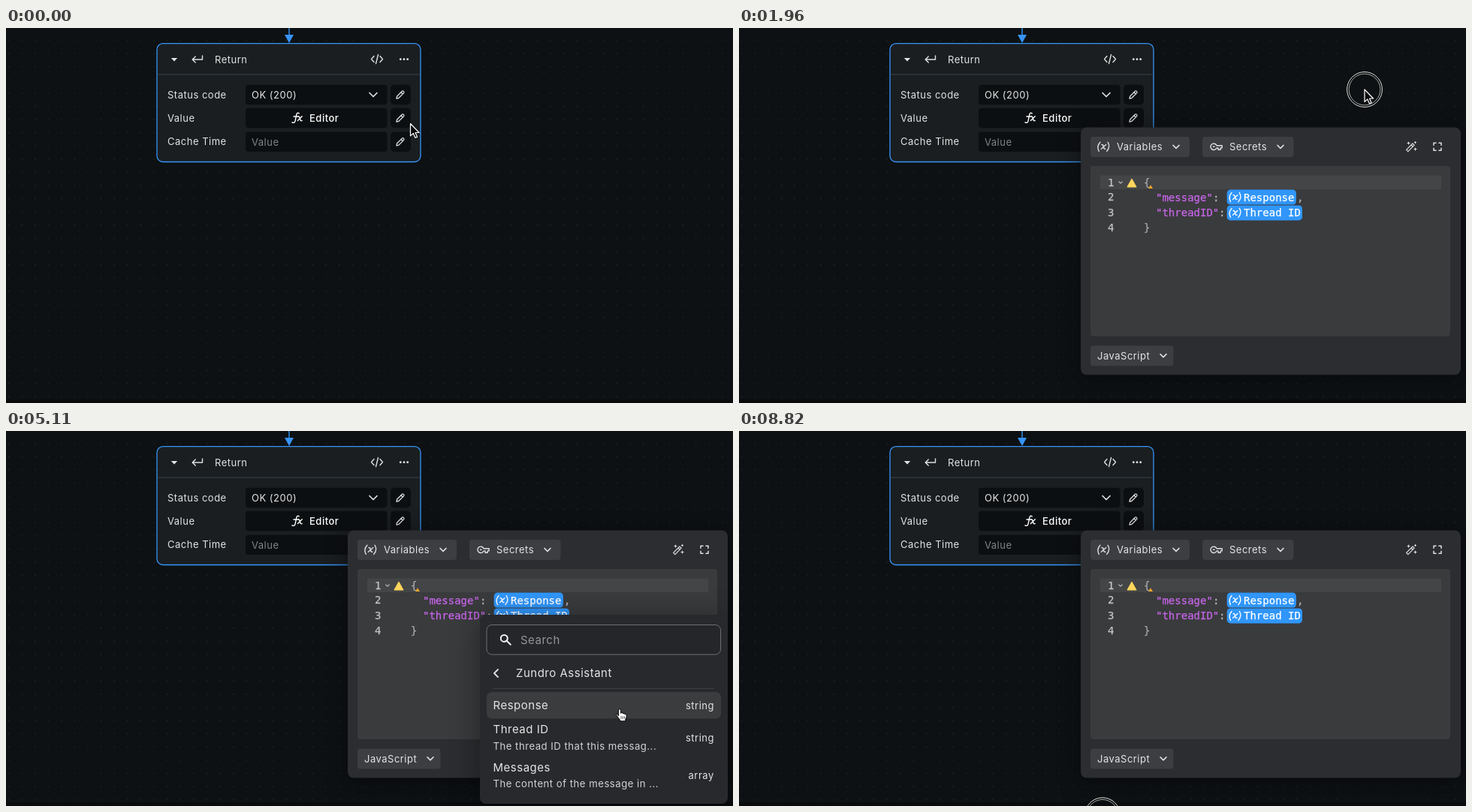
Write an HTML page that moves like this. It is 968x500 px and loops after 8.89 s.

```html
<!DOCTYPE html>
<html lang="en">
<head>
<meta charset="utf-8">
<title>Return block editor</title>
<style>
  html, body { margin: 0; width: 100%; height: 100%; overflow: hidden; background: #0d1113; }
  svg { display: block; width: 968px; height: 500px; }
  text { font-family: Inter, Roboto, sans-serif; letter-spacing: .5px; white-space: pre; }
  text.mono { font-family: "DejaVu Sans Mono", monospace; letter-spacing: 0; stroke-width: .25px; }
  .panelBack { filter: drop-shadow(0 5px 14px rgba(5, 3, 9, .6)); }
  .popupBack { filter: drop-shadow(0 6px 19px rgba(0, 0, 0, .4)); }
  .icon { fill: none; stroke-linecap: round; stroke-linejoin: round; }
</style>
</head>
<body>
<svg id="stage" viewBox="0 0 968 500"></svg>
<script>
const LOOP = 8890, STEP = 70;
const BLUE = '#3794fa';

// ---- drawing helpers -------------------------------------------------
const rect = (x, y, w, h, r, fill, extra = '') =>
  `<rect x="${x}" y="${y}" width="${w}" height="${h}" rx="${r}" fill="${fill}" ${extra}/>`;
const text = (x, mid, str, size = 13, fill = '#e3e4e5', extra = '') =>
  `<text x="${x}" y="${mid + size * .36}" font-size="${size}" fill="${fill}" ${extra}>${str}</text>`;
const mono = (x, mid, str, fill) => text(x, mid, str, 14, fill, `class="mono" stroke="${fill}"`);
const icon = (x, y, d, width = 1.4, stroke = '#dfe0e1') =>
  `<path class="icon" transform="translate(${x} ${y})" d="${d}" stroke="${stroke}" stroke-width="${width}"/>`;
const poly = (points, fill) => `<polygon points="${points}" fill="${fill}"/>`;
const group = (id, body, extra = '') => `<g id="${id}" ${extra}>${body}</g>`;

const DOWN = 'M-4-2 0 2 4-2', RIGHT = 'M-2.5-5 2.5 0-2.5 5', LEFT = 'M2.5-5-2.5 0 2.5 5';
const PENCIL = 'M-5 5-4.3 2 2.4-4.7Q3.4-5.6 4.4-4.6T4.7-2.4L-2 4.3ZM1-3.3 3.3-1';
const VARIABLE = 'M-4.6-6Q-9.8-.4-6.2 6M5.6-6Q9.4 0 4.2 6M-2.6-2.7Q-.8-3.6-.2 0T2.4 2.8M3.2-2.9-3.2 2.9';

// ---- canvas and block ------------------------------------------------
function field(y) {
  return rect(319, y, 188.5, 26.5, 4, '#0c0f11') + rect(512, y, 27, 26.5, 5, '#0c0f11') +
    icon(525, y + 13.3, PENCIL, 1.3);
}

const backdrop = `
  <defs><pattern id="dots" x="2.7" y="15.7" width="17.6" height="17.6" patternUnits="userSpaceOnUse">
    <circle cx=".8" cy=".8" r=".75" fill="#282d30"/></pattern></defs>` +
  rect(0, 0, 968, 500, 0, '#0d1113') + rect(0, 0, 968, 500, 0, 'url(#dots)') +
  rect(0, 495.5, 968, 5, 0, '#090b0d');

const block =
  `<path d="M377 0V12" stroke="${BLUE}" stroke-width="1.4"/>` + poly('371,9 383,9 377,20', BLUE) +
  rect(201, 20.7, 351, 157.8, 8, '#1a1e20', `stroke="${BLUE}" stroke-width="1.3"`) +
  '<path d="M201.6 62H551.4" stroke="#364350"/>' +
  poly('219.8,40 228.2,40 224,44.4', '#e3e4e5') +
  icon(255, 42, 'M6.5-5V0H-6.5M-2.8-4-6.8 0-2.8 4', 1.4) +
  text(278, 42, 'Return') +
  icon(494, 41.5, 'M-4-4-7.5 0-4 4M4-4 7.5 0 4 4M1.5-6-1.5 6', 1.4) +
  [525.3, 530, 534.7].map(x => `<circle cx="${x}" cy="41.7" r="1.4" fill="#e3e4e5"/>`).join('') +
  text(215, 89.5, 'Status code') + text(215, 120, 'Value') + text(215, 151.7, 'Cache Time') +
  [75.7, 106.7, 138.5].map(field).join('') +
  text(327, 89, 'OK (200)') + icon(489, 89, 'M-5-2.5 0 2.5 5-2.5', 1.7) +
  icon(387, 120, 'M3.2-6.2Q.8-7.8-.2-4.6L-2 4.2Q-3 7.4-6 5.8M-4-2H1.8M2-2.2Q3.6-2.6 4.4 1T7.2 3.4M7.2-2.2 1.4 3.6', 1.4, '#fff') +
  text(404, 120, 'Editor', 13, '#fff', 'font-weight="500"') +
  text(327, 152.3, 'Value', 13, '#818486');

// ---- code panel ------------------------------------------------------
const button = (x, y, w, label, labelX, arrowX) =>
  rect(x, y, w, 27, 4, '#3c3e41') + text(labelX, y + 13.4, label) + icon(arrowX, y + 13.4, DOWN, 1.5);
const chip = (y, w, label) =>
  rect(649.7, y, w, 20, 4.5, '#3096fa') + icon(660.7, y + 10, VARIABLE, 1.4, '#fff') +
  mono(672, y + 10, label, '#fff');

const panel =
  rect(455, 132.5, 506, 330, 8, '#2b2d30', 'class="panelBack"') +
  button(468, 145, 132, 'Variables', 503, 582) + icon(485.5, 158.3, VARIABLE, 1.4) +
  button(617, 145, 121.5, 'Secrets', 653, 721) +
  icon(635, 158.3, 'M1-1.6A4.2 4.2 0 1 0 1 1.6H3V4H6.2V1.6H8.2V-1.6ZM-3.6 0H-2', 1.4) +
  icon(895, 158, 'M-6.4 4.4 2-4 4.2-1.8-4.2 6.6ZM0-2 2.2 .2M-3.5-6V-3M-5-4.5H-2M5.5 2V5M4 3.5H7M5.5-6.5V-4.5M4.5-5.5H6.5', 1.2) +
  icon(930, 158.3, 'M-5-2V-5H-2M2-5H5V-2M5 2V5H2M-2 5H-5V2', 1.5) +
  rect(468, 184, 479, 227, 4, '#3a3b3d') + rect(481, 196.5, 454, 18.5, 0, '#444547') +
  [206, 225, 246, 266].map((y, i) => mono(491, y, i + 1, '#c4c5c6')).join('') +
  icon(508, 206, 'M-2.2-1 0 1.2 2.2-1', 1.2, '#b5b6b8') +
  '<path d="M523 201.6 528.7 211.8H517.3Z" fill="#ffd65c" stroke="#ffd65c" stroke-width="1.4" stroke-linejoin="round"/>' +
  mono(539, 206, '{', '#a9aaac') + poly('545,214 551,214 548,209.3', '#eda42c') +
  mono(555, 225.5, '"message"', '#c866ea') + mono(631, 225.5, ':', '#b4b5b7') +
  chip(215.6, 92.2, 'Response') + mono(743, 225.5, ',', '#b4b5b7') +
  mono(555, 246, '"threadID"', '#c866ea') + mono(639, 246, ':', '#b4b5b7') +
  chip(236.4, 100.3, 'Thread ID') +
  mono(539, 266, '}', '#a9aaac') +
  rect(538, 198.5, 1, 15, 0, '#8fb8e8', 'id="codeCaret"') +
  button(468, 423.5, 110.5, 'JavaScript', 477, 565);

// ---- variable picker -------------------------------------------------
const SOURCE = 'Zundro Assistant';
const item = (mid, name, typeX, type, typeMid, note = '') =>
  text(648.5, mid, name, 15) + text(typeX, typeMid, type) +
  (note && text(648.5, typeMid + 11, note, 13.15, '#d2d3d5'));

const picker =
  rect(631, 245, 330, 146, 8, '#28292c', 'id="sheet" class="popupBack"') +
  rect(640, 258.5, 311.5, 39.5, 7, '#252629', 'id="search"') +
  icon(665, 278, 'M6.8 6.8 2.2 2.2M2.8-1.6A4.5 4.5 0 1 1-6.2-1.6 4.5 4.5 0 0 1 2.8-1.6', 2, '#f1f1f2') +
  text(685, 278.7, 'Search', 15, '#939598') + rect(685, 269.5, 1.1, 18.5, 0, '#7fb8f7', 'id="searchCaret"') +
  rect(640, 348, 312, 35.5, 7, '#3b3c3e', 'id="hover"') +
  group('sources',
    text(648.5, 325, 'Request', 15) + text(648.5, 360.5, SOURCE, 15) +
    icon(929, 325, RIGHT, 2, '#f1f1f2') + icon(929, 360.5, RIGHT, 2, '#f1f1f2')) +
  group('items',
    icon(652.5, 323, LEFT, 1.8) + text(679, 323, SOURCE, 15) +
    '<path d="M648 343.5H943" stroke="#3d3e41"/>' +
    item(366, 'Response', 905, 'string', 366) +
    item(398, 'Thread ID', 905, 'string', 409, 'The thread ID that this messag...') +
    item(448.5, 'Messages', 908.5, 'array', 459.5, 'The content of the message in ...'));

// ---- pointer ---------------------------------------------------------
const pointer =
  group('ring', ['22.4" stroke="#0008" stroke-width="3', '23.4" stroke="#e6e6e6" stroke-width="1', '20.9" stroke="#d0d0d0" stroke-width=".8']
    .map(a => `<circle fill="none" r="${a}"/>`).join('')) +
  group('arrow', '<path d="M0 0V16.4L3.8 12.9 6.4 18.8 9 17.6 6.5 12H11.6Z" fill="#090909" stroke="#fff" stroke-width="1.2" stroke-linejoin="round"/>') +
  group('beam', ['#111" stroke-width="2.8', '#fff" stroke-width="1.2']
    .map(a => `<path fill="none" d="M-4-8Q0-8 0-5.5Q0-8 4-8M0-5.5V5.5M-4 8Q0 8 0 5.5Q0 8 4 8M-2 2H2" stroke="${a}"/>`).join('')) +
  group('hand', `<path d="M-1.6 8.5V1.2Q-1.6-.4-.1-.4T1.4 1.2V5Q3.6 3.6 4.4 5.6Q6.2 4.6 6.8 6.4Q9 6 9 8.4
    Q9.2 12 7.6 13.4V15.6H.2V14Q-2 11.6-3.2 9.6-5.4 7-4.4 6.2-3.2 5.4-1.6 8.5Z"
    fill="#fff" stroke="#111" stroke-width="1.1" stroke-linejoin="round"/>
    <path d="M1.8 9.2V12.6M4 9.2V12.6M6.2 9.2V12.6" stroke="#222" stroke-width=".8"/>`);

document.getElementById('stage').innerHTML =
  backdrop + block + group('panel', panel) + group('picker', picker) + pointer;

const el = {};
document.querySelectorAll('[id]').forEach(node => el[node.id] = node);

// ---- timeline --------------------------------------------------------
const ease = {
  both: p => p * p * (3 - 2 * p),
  in: p => p * p,
  out: p => 1 - (1 - p) ** 2
};
// time, x, y, pointer shape, easing towards this stop
const PATH = [
  [0, 538.5, 127.5, 'arrow'], [40, 538.5, 127.5, 'arrow'],
  [210, 471, 109, 'hand'], [350, 471, 109, 'hand'],
  [770, 497, 262, 'beam'], [1190, 497, 262, 'beam'],
  [1400, 724, 201, 'beam', 'in'], [1750, 833, 82, 'arrow', 'out'], [2030, 833, 82, 'arrow'],
  [2170, 690, 225, 'arrow'], [2590, 690, 225, 'arrow'],
  [3080, 932, 364.5, 'hand'], [4230, 932, 364.5, 'hand'],
  [4830, 817, 368.5, 'hand'], [5040, 817, 368.5, 'hand'],
  [5460, 820, 404, 'hand'], [5740, 820, 404, 'hand'],
  [6090, 835, 457, 'hand'], [6930, 835, 457, 'hand'],
  [7210, 832.4, 62, 'arrow'], [7840, 832.4, 62, 'arrow'],
  [8610, 489, 494, 'arrow'], [8680, 486, 508, 'arrow'], [8820, 484, 512.3, 'arrow'], [LOOP, 484, 512.3, 'arrow']
];
const CLICKS = [[210, 350], [1960, 2100], [2170, 2310], [3990, 4130], [7630, 7770], [8820, LOOP]];

const between = (t, a, b) => t >= a && t < b;
const ramp = (t, a, b) => Math.min(1, Math.max(0, (t - a) / (b - a)));
const show = (node, on) => node.setAttribute('visibility', on ? 'inherit' : 'hidden');
const set = (node, attrs) => { for (const k in attrs) node.setAttribute(k, attrs[k]); };

function pointerAt(t) {
  const i = PATH.findIndex(stop => stop[0] > t);
  const a = PATH[i - 1], b = PATH[i], p = (t - a[0]) / (b[0] - a[0]);
  const e = ease[b[4] || 'both'](p);
  return { x: a[1] + (b[1] - a[1]) * e, y: a[2] + (b[2] - a[2]) * e, kind: (p > .5 ? b : a)[3] };
}

function hoverBox(x, y, listing) {
  if (!listing) return x > 906 && between(y, 343, 378) ? [906, 343, 46, 35] : null;
  if (x < 640 || x > 952) return null;
  if (between(y, 348, 384)) return [640, 348, 312, 35.5];
  if (between(y, 384, 434)) return [640, 386, 312, 46];
  return between(y, 434, 485) ? [640, 436.5, 312, 46] : null;
}

function render(t) {
  const { x, y, kind } = pointerAt(t);
  for (const name of ['arrow', 'beam', 'hand', 'ring']) {
    show(el[name], name === kind || (name === 'ring' && CLICKS.some(c => between(t, ...c))));
    set(el[name], { transform: `translate(${x} ${y})` });
  }

  set(el.panel, { opacity: ramp(t, 280, 490) });
  show(el.codeCaret, between(t, 7770, 8260));

  const listing = t >= 4200, focus = t < 3990;
  const leaving = ramp(t, 7770, 8050);
  const opacity = ramp(t, 2240, 2450) * (1 - leaving ** 1.2);
  const scale = 1 - leaving * .008;
  set(el.picker, { opacity, transform: `translate(952 245) scale(${scale}) translate(-952 -245)` });
  show(el.picker, opacity > 0);
  set(el.sheet, { height: listing ? 252 : 146 });
  set(el.search, { stroke: focus ? BLUE : '#6c6f71', 'stroke-width': focus ? 2.2 : 1 });
  show(el.searchCaret, focus && (t - 2380) % 1060 < 530);
  show(el.sources, !listing);
  show(el.items, listing);

  const box = hoverBox(x, y, listing);
  show(el.hover, box);
  if (box) set(el.hover, { x: box[0], y: box[1], width: box[2], height: box[3] });
}

const start = performance.now();
function tick() {
  const t = (performance.now() - start) % LOOP;
  render(Math.floor(t / STEP) * STEP);
  requestAnimationFrame(tick);
}
tick();
</script>
</body>
</html>
```
